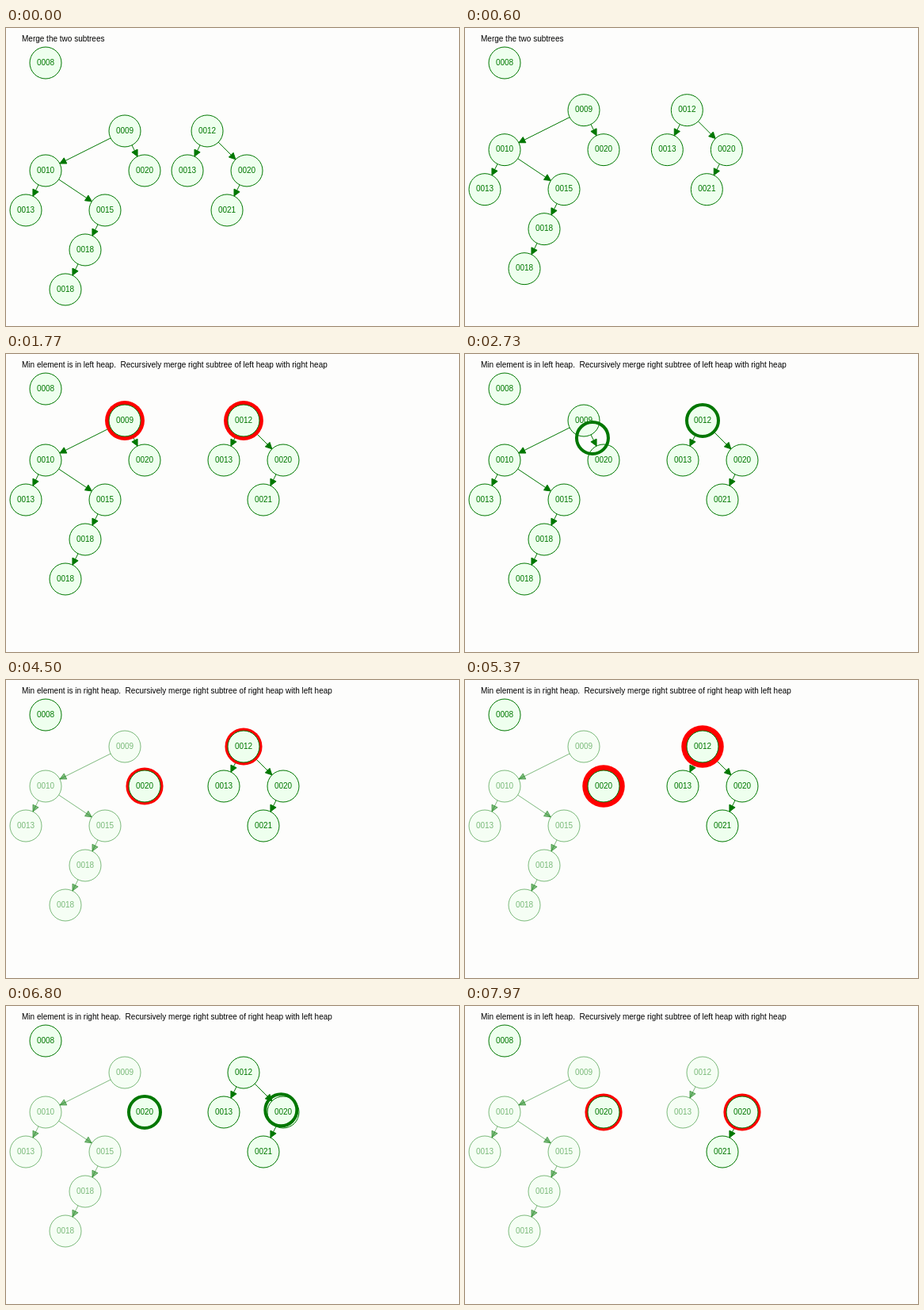
Recreate the animation shown at these times as an HTML page with a canvas. Size 572x376 px, loop 8 s.

```html
<!DOCTYPE html>
<html>
<head>
<meta charset="utf-8">
<style>
html, body { margin: 0; height: 100%; overflow: hidden; background: #fdfdfc; }
canvas { display: block; }
</style>
</head>
<body>
<canvas id="stage" width="572" height="376"></canvas>
<script>
const ctx = document.getElementById('stage').getContext('2d');
const LOOP = 8000, RADIUS = 20;
const PAPER = '#fdfdfc', GREEN = '#007700', RED = '#ff0000', FILL = '#eeffee';

const node = (label, x, y, parent) => ({ label, x, y, parent });
const single = node('0008', 50, 44);

const l9 = node('0009', 150, 84);
const l10 = node('0010', 50, 134, l9);
const l20 = node('0020', 175, 134, l9);
const l13 = node('0013', 25, 184, l10);
const l15 = node('0015', 125, 184, l10);
const l18 = node('0018', 100, 234, l15);
const l18b = node('0018', 75, 284, l18);
const left = [l9, l10, l20, l13, l15, l18, l18b];

const r12 = node('0012', 300, 84);
const r13 = node('0013', 275, 134, r12);
const r20 = node('0020', 350, 134, r12);
const r21 = node('0021', 325, 184, r20);
const right = [r12, r13, r20, r21];

const all = [single, ...left, ...right];

const message = (from, other) =>
  `Min element is in ${from} heap.  Recursively merge right subtree of ${from} heap with ${other} heap`;

// Each merge: pulse both roots, move a ring to the right child, then fade the detached part.
const merges = [
  { start: 1070, move: 2225, arrive: 3380, fade: 3400,
    root: l9, next: l20, other: r12, text: message('left', 'right') },
  { start: 4500, move: 5570, arrive: 6870, fade: 6900,
    root: r12, next: r20, other: l20, text: message('right', 'left') },
  { start: 7970, move: LOOP,
    root: l20, other: r20, text: message('left', 'right') }
];

const progress = (t, from, to) => Math.min(1, Math.max(0, (t - from) / (to - from)));

function circle(x, y, r) {
  ctx.beginPath();
  ctx.arc(x, y, r, 0, 2 * Math.PI);
}

function drawEdge(a, b) {
  const dx = b.px - a.px, dy = b.py - a.py, d = Math.hypot(dx, dy);
  const ux = dx / d, uy = dy / d;
  const tipX = b.px - ux * RADIUS, tipY = b.py - uy * RADIUS;
  const baseX = tipX - ux * 8, baseY = tipY - uy * 8;
  ctx.beginPath();
  ctx.moveTo(a.px + ux * RADIUS, a.py + uy * RADIUS);
  ctx.lineTo(tipX, tipY);
  ctx.stroke();
  ctx.beginPath();
  ctx.moveTo(tipX, tipY);
  ctx.lineTo(baseX - uy * 4, baseY + ux * 4);
  ctx.lineTo(baseX + uy * 4, baseY - ux * 4);
  ctx.closePath();
  ctx.fillStyle = GREEN;
  ctx.fill();
  ctx.stroke();
}

function drawNode(n, glow) {
  if (glow) {
    circle(n.px, n.py, RADIUS + glow);
    ctx.fillStyle = RED;
    ctx.fill();
  }
  circle(n.px, n.py, RADIUS);
  ctx.fillStyle = FILL;
  ctx.fill();
  ctx.stroke();
  ctx.fillStyle = GREEN;
  ctx.fillText(n.label, n.px, n.py);
}

function drawRing(x, y) {
  circle(x, y, RADIUS);
  ctx.lineWidth = 4;
  ctx.stroke();
}

function render(t) {
  ctx.fillStyle = PAPER;
  ctx.fillRect(0, 0, 572, 376);

  const offset = 46 * (1 - progress(t, 0, 1050));
  for (const n of all) {
    n.px = n.x - (right.includes(n) ? offset : 0);
    n.py = n.y + (n === single ? 0 : offset);
  }

  const merge = merges.findLast(m => t >= m.start);
  const cut = merges.filter(m => t >= m.fade).map(m => m.next);
  const faded = [];
  if (cut.includes(l20)) faded.push(...left.filter(n => n !== l20));
  if (cut.includes(r20)) faded.push(r12, r13);
  const alpha = n => faded.includes(n) ? 0.5 : 1;

  ctx.font = '10px "Liberation Sans", Arial, sans-serif';
  ctx.textAlign = 'left';
  ctx.textBaseline = 'alphabetic';
  ctx.fillStyle = '#000';
  ctx.fillText(merge ? merge.text : 'Merge the two subtrees', 20, 17);

  ctx.textAlign = 'center';
  ctx.textBaseline = 'middle';
  ctx.strokeStyle = GREEN;
  ctx.lineWidth = 1;
  for (const n of all) {
    if (!n.parent || cut.includes(n)) continue;
    ctx.globalAlpha = alpha(n.parent);
    drawEdge(n.parent, n);
  }

  const pulsing = merge && t < merge.move ? [merge.root, merge.other] : [];
  const phase = ((t - 4500) / 1619 + 10.43) % 1;
  const glow = Math.abs(phase * 8 - 4) + 3;
  for (const n of all) {
    ctx.globalAlpha = alpha(n);
    drawNode(n, pulsing.includes(n) ? glow : 0);
  }
  ctx.globalAlpha = 1;

  if (merge && t >= merge.move) {
    const { root, next, other } = merge;
    const p = progress(t, merge.move, merge.arrive);
    drawRing(root.x + (next.x - root.x) * p, root.y + (next.y - root.y) * p);
    drawRing(other.x, other.y);
  }
}

function tick() {
  render(performance.now() % LOOP);
  requestAnimationFrame(tick);
}
tick();
</script>
</body>
</html>
```
